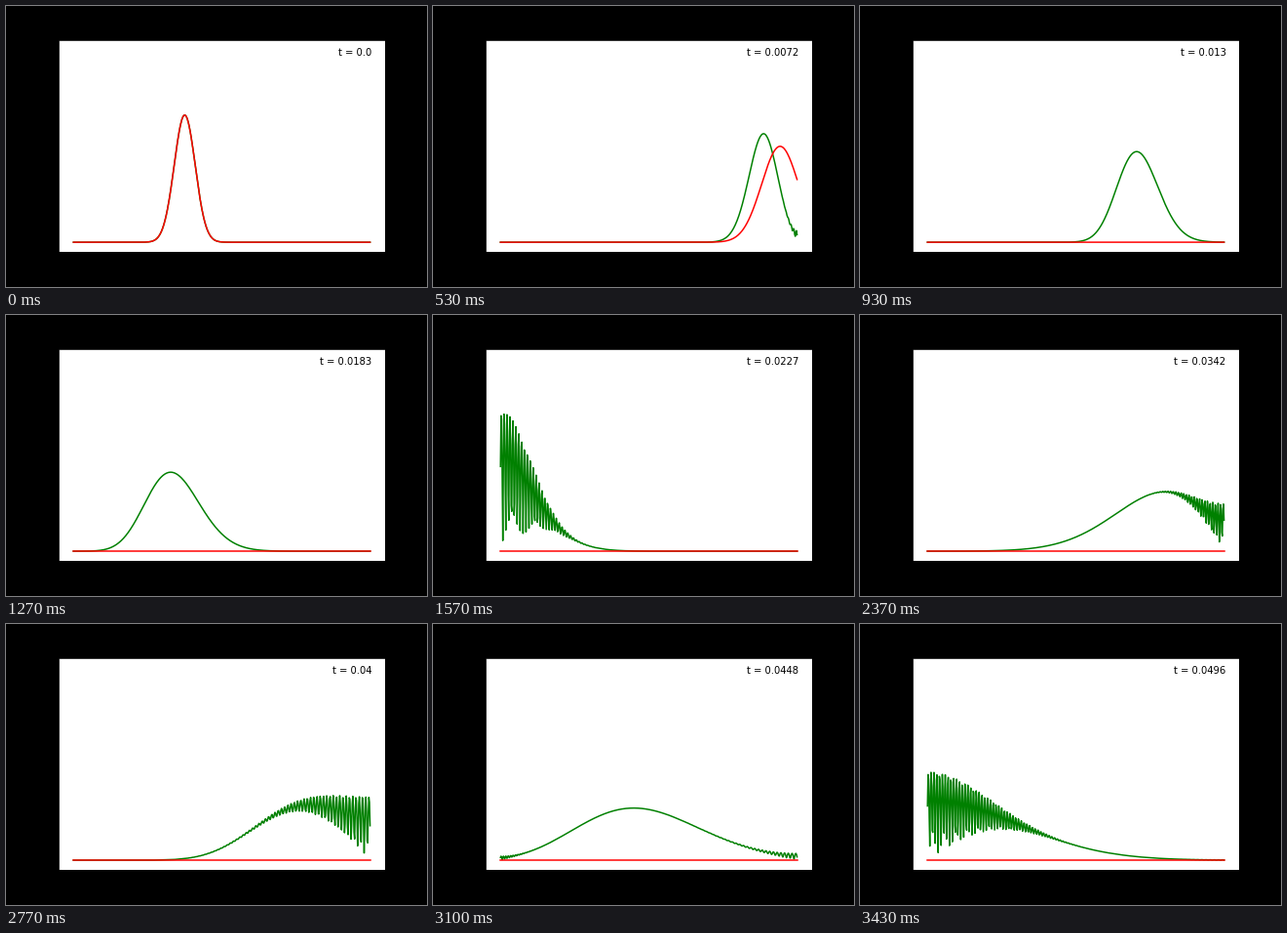
Animation, 432 px wide and 288 px high, one loop 3460 ms. Source, as a matplotlib script:

```python
import numpy as np
import matplotlib.pyplot as plt
from matplotlib.animation import FuncAnimation

# Free Gaussian wave packet: Crank-Nicolson in a box (green) vs. exact (red)
N = 500
X0, SIGMA, K0 = -0.25, 0.05, 50 * np.pi
FRAMES, LOOP_MS = 104, 3460
STEPS_PER_FRAME = 15

x = np.linspace(-1, 1, N)
dx = x[1] - x[0]
dt = 2 * dx**2
times = np.arange(FRAMES) * STEPS_PER_FRAME * dt


def numeric_modulus():
    """|psi| per frame, stepping every sine mode of the box by its CN phase."""
    m = np.arange(1, N + 1)
    angle = np.pi * m / (N + 1)
    modes = np.sqrt(2 / (N + 1)) * np.sin(np.outer(m, angle))
    energy = (1 - np.cos(angle)) / dx**2
    omega = 2 * np.arctan(energy * dt / 2) / dt
    start = np.exp(-((x - X0) ** 2) / (4 * SIGMA**2) + 1j * K0 * x)
    coeffs = modes.T @ start
    waves = coeffs[:, None] * np.exp(-1j * np.outer(omega, times))
    return np.abs(modes @ waves).T


def exact_modulus(t):
    spread = 1 + (t / (2 * SIGMA**2)) ** 2
    shift = x - X0 - K0 * t
    return spread**-0.25 * np.exp(-(shift**2) / (4 * SIGMA**2 * spread))


numeric = numeric_modulus()
peak = numeric.max()

fig = plt.figure(figsize=(6, 4), dpi=72, facecolor="black")
fig.subplots_adjust(left=0.125, right=0.9, bottom=0.125, top=0.88)
ax = fig.add_subplot()
ax.set(xlim=(-1.1, 1.1), ylim=(-0.05 * peak, 1.05 * peak), xticks=[], yticks=[])

box_line, = ax.plot(x, numeric[0], color="g", lw=1.5)
free_line, = ax.plot(x, exact_modulus(0), color="r", lw=1.5)
label = ax.text(0.96, 0.96, "", transform=ax.transAxes, ha="right", va="top",
                fontsize=10, family="DejaVu Sans")


def draw(i):
    box_line.set_ydata(numeric[i])
    free_line.set_ydata(exact_modulus(times[i]))
    label.set_text(f"t = {round(float(times[i]), 4)}")
    return box_line, free_line, label


anim = FuncAnimation(fig, draw, frames=FRAMES, interval=LOOP_MS / FRAMES,
                     repeat=True, repeat_delay=0)
plt.show()
```
